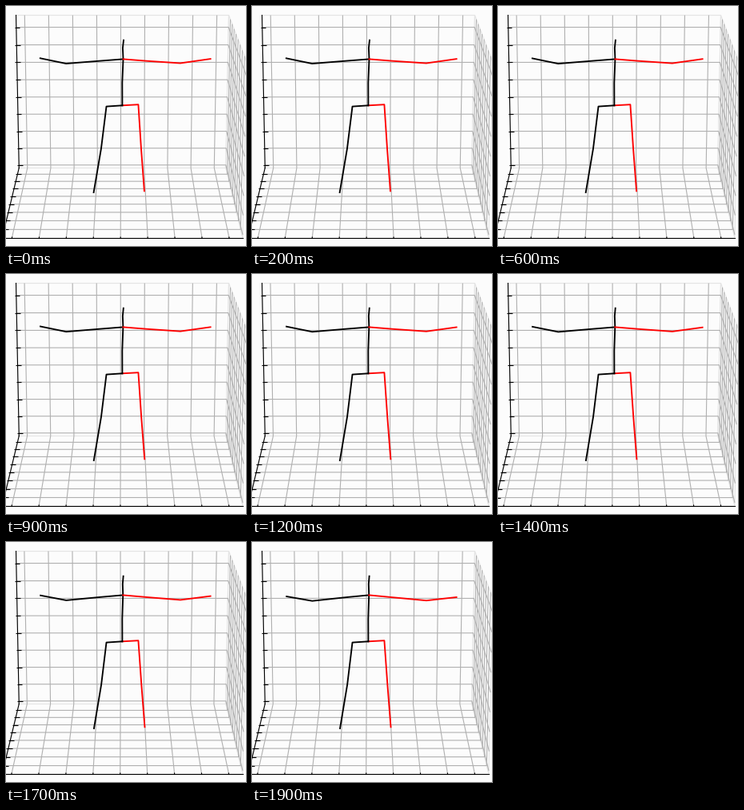
Animation, 300 px wide and 300 px high, one loop 2000 ms. Source, as a matplotlib script:

```python
import numpy as np
import matplotlib.pyplot as plt
from matplotlib.animation import FuncAnimation
from matplotlib.collections import LineCollection

SIZE, DPI = 300, 100
FRAMES, STEP = 20, 100
THIN, THICK = 0.8, 1.5             # line widths in points

# Camera: box of half sizes 1 x 1 x 0.75, seen from the front, 15 degrees up
CENTRE = 145.5, 142.3
FOCAL, DIST = 1778.0, 12.598
COS, SIN = np.cos(np.radians(15)), np.sin(np.radians(15))
TOP = 0.75
RADIUS, TICK, INNER = 1.7, 0.2, 0.96


def project(x, y, z):
    """Box coordinates (right, towards viewer, up) to stage pixels."""
    k = FOCAL / (DIST - y * COS - z * SIN)
    return CENTRE[0] + x * k, CENTRE[1] - (z * COS - y * SIN) * k


def path(*points):
    return [project(*p) for p in points]


def ticks(offset):
    """Positions of round values along an axis centred on the body."""
    pos = (np.arange(-6, 7) * TICK + offset) / (RADIUS / 2) * INNER
    return pos[np.abs(pos) <= INNER]


Z_TICKS = TOP * INNER * (np.arange(0, RADIUS, TICK) / (RADIUS / 2) - 1)
OUT, IN = 1 / 60, 1 / 30


def grid_lines(xs, ys):
    lines = [path((x, 1, -TOP), (x, -1, -TOP), (x, -1, TOP)) for x in xs]
    lines += [path((-1, y, -TOP), (1, y, -TOP), (1, y, TOP)) for y in ys]
    lines += [path((-1, -1, z), (1, -1, z), (1, 1, z)) for z in Z_TICKS]
    return lines


def tick_marks(xs, ys):
    marks = [path((x, 1 + OUT, -TOP), (x, 1 - IN, -TOP)) for x in xs]
    marks += [path((-1 - OUT, y, -TOP), (-1 + IN, y, -TOP)) for y in ys]
    marks += [path((-1 - OUT, -1, z), (-1 + IN, -1, z)) for z in Z_TICKS]
    return marks


# Joint: x, y, steady drift in x, late drop in y
JOINTS = {
    "hip": (145.4, 124.3, 0, 0),
    "r_hip": (165.4, 123.2, 0, 0),
    "r_knee": (169.0, 179, 0.4, 0),
    "r_foot": (172.9, 231.3, 0.6, 0),
    "l_hip": (125.5, 125.6, 0, 0),
    "l_knee": (118.9, 178.5, 0.2, 0),
    "l_foot": (109.6, 233.0, 0.4, 0),
    "spine": (145.3, 96, 0, 0),
    "chest": (146.5, 66.4, -0.3, 0),
    "neck": (145.9, 52.5, -0.1, 0),
    "head": (147.0, 42.7, -0.4, 0),
    "l_shoulder": (119, 68.5, 0, 0.4),
    "l_elbow": (75.1, 72.0, 0.2, 1.4),
    "l_wrist": (42.8, 65.3, 0.4, 2.3),
    "r_shoulder": (174.5, 68.6, 0, 0.4),
    "r_elbow": (217.8, 71.5, 0.2, 1.4),
    "r_wrist": (255.6, 66.1, 0, 2.4),
}
LIMBS = [
    ("red", "hip r_hip r_knee r_foot"),
    ("black", "hip l_hip l_knee l_foot"),
    ("black", "hip spine chest neck head"),
    ("black", "chest l_shoulder l_elbow l_wrist"),
    ("red", "chest r_shoulder r_elbow r_wrist"),
]


def joint(name, p):
    x, y, drift, drop = JOINTS[name]
    return x + drift * p, y + drop * (0.2 * p + p ** 7)


fig = plt.figure(figsize=(SIZE / DPI, SIZE / DPI), dpi=DPI,
                 facecolor="#fcfcfc")
ax = fig.add_axes([0, 0, 1, 1])
ax.set_xlim(0, SIZE)
ax.set_ylim(SIZE, 0)
ax.axis("off")

PANES = [
    [(-1, -1, -TOP), (1, -1, -TOP), (1, -1, TOP), (-1, -1, TOP)],
    [(1, -1, -TOP), (1, 1, -TOP), (1, 1, TOP), (1, -1, TOP)],
    [(-1, -1, -TOP), (1, -1, -TOP), (1, 1, -TOP), (-1, 1, -TOP)],
]
for pane in PANES:
    ax.add_patch(plt.Polygon(path(*pane), fc="#fcfcfc", ec="#e4e4e4",
                             lw=THIN))


def add_lines(color, cap, segments=()):
    lines = LineCollection(segments, colors=color, linewidths=THIN,
                           capstyle=cap)
    ax.add_collection(lines, autolim=False)
    return lines


grid = add_lines("#b0b0b0", "butt")
AXES = [
    ((-1, 1, -TOP), (1, 1, -TOP)),
    ((-1, 1, -TOP), (-1, -1, -TOP)),
    ((-1, -1, -TOP), (-1, -1, TOP)),
]
add_lines("black", "projecting", [path(*ends) for ends in AXES])
marks = add_lines("black", "butt")
limbs = [(ax.plot([], [], color=c, lw=THICK * 0.9)[0], names.split())
         for c, names in LIMBS]


def draw(i):
    p = i / (FRAMES - 1)
    xs = ticks(-0.0136 - 0.003 * p)
    ys = ticks(0.095 + 0.004 * p)
    grid.set_segments(grid_lines(xs, ys))
    marks.set_segments(tick_marks(xs, ys))
    for line, names in limbs:
        line.set_data(*zip(*(joint(n, p) for n in names)))
    return [grid, marks] + [line for line, _ in limbs]


anim = FuncAnimation(fig, draw, frames=FRAMES, interval=STEP, repeat=True,
                     repeat_delay=0, blit=False)
plt.show()
```
